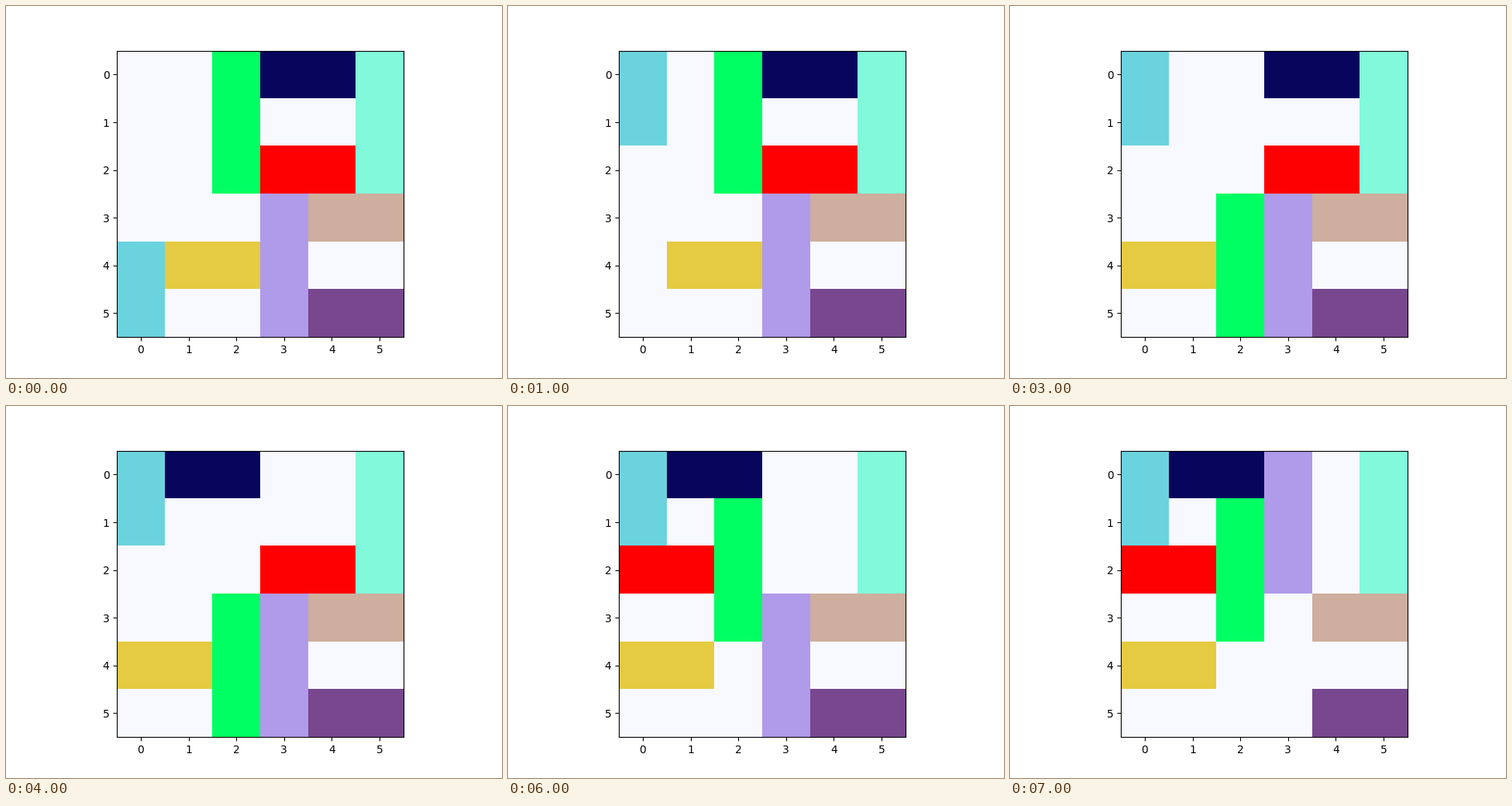
A matplotlib script for the animation above (8000 ms loop, 640 px wide and 480 px high).

```python
import numpy as np
import matplotlib.pyplot as plt
from matplotlib.animation import FuncAnimation
from matplotlib.colors import to_rgb

SIZE = 6
EMPTY = "#f8f9ff"

# name: (row, column, height, width, colour)
BLOCKS = {
    "cyan": (4, 0, 2, 1, "#6bd3de"),
    "yellow": (4, 1, 1, 2, "#e5cb41"),
    "green": (0, 2, 3, 1, "#00ff62"),
    "navy": (0, 3, 1, 2, "#08055d"),
    "red": (2, 3, 1, 2, "#ff0000"),
    "aqua": (0, 5, 3, 1, "#81f9da"),
    "lilac": (3, 3, 3, 1, "#b09aea"),
    "tan": (3, 4, 1, 2, "#ceae9e"),
    "violet": (5, 4, 1, 2, "#78478d"),
}

# One slide per second: name, rows down, columns right
MOVES = [
    ("cyan", -4, 0),
    ("yellow", 0, -1),
    ("green", 3, 0),
    ("navy", 0, -2),
    ("red", 0, -3),
    ("green", -2, 0),
    ("lilac", -3, 0),
]


def board(step):
    """Colour grid after the first `step` moves."""
    grid = np.full((SIZE, SIZE, 3), to_rgb(EMPTY))
    for name, (row, col, height, width, color) in BLOCKS.items():
        for moved, down, right in MOVES[:step]:
            if moved == name:
                row += down
                col += right
        grid[row:row + height, col:col + width] = to_rgb(color)
    return grid


fig, ax = plt.subplots(figsize=(6.4, 4.8), dpi=100)
image = ax.imshow(board(0), interpolation="nearest")
ax.set_xticks(range(SIZE))
ax.set_yticks(range(SIZE))


def update(step):
    image.set_data(board(step))
    return [image]


anim = FuncAnimation(fig, update, frames=len(MOVES) + 1, interval=1000,
                     repeat=True, repeat_delay=0)
plt.show()
```
